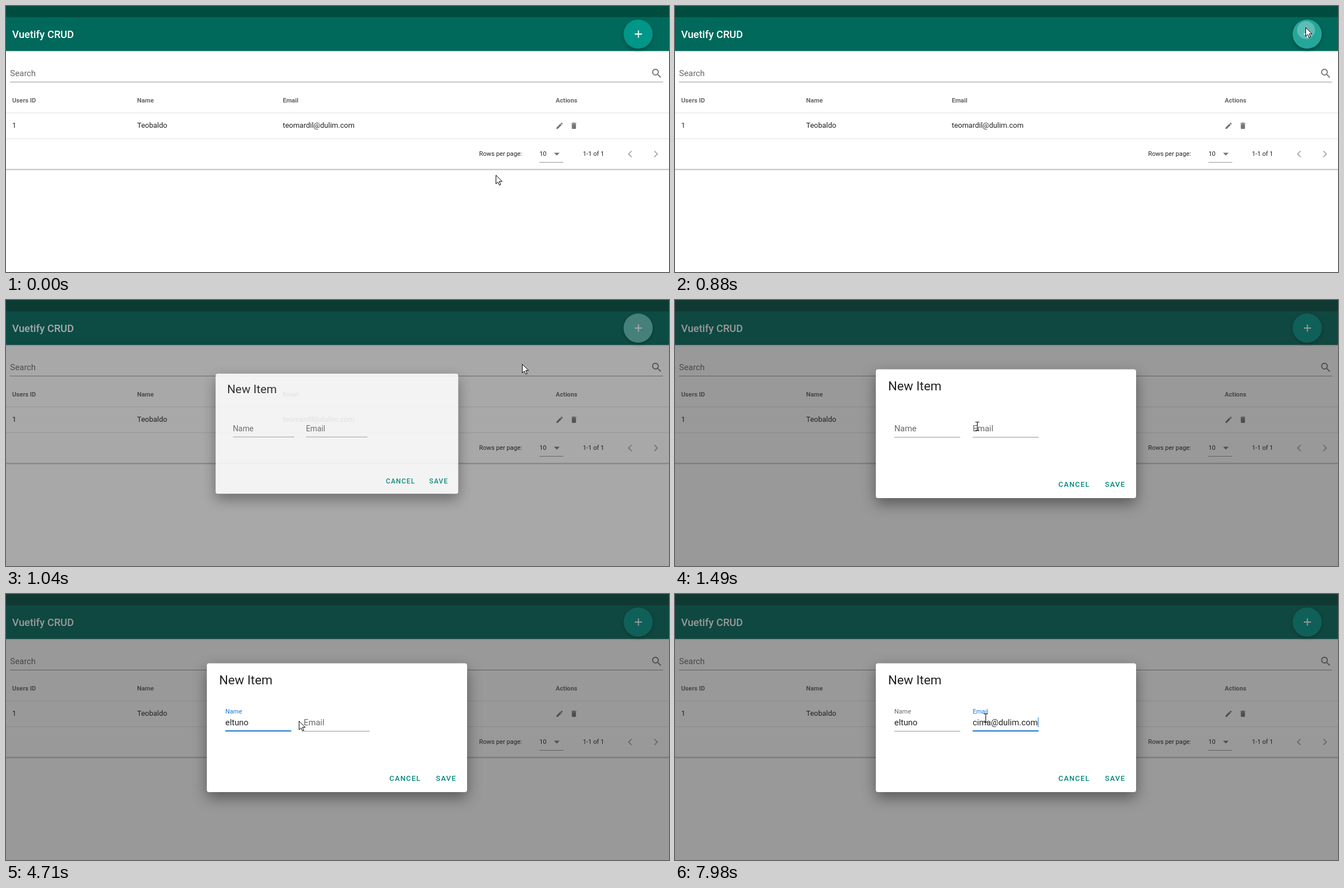
Write an HTML page that moves like this. It is 1182x474 px and loops after 8000 ms.

```html
<!DOCTYPE html>
<html lang="en">
<head>
<meta charset="utf-8">
<title>Vuetify CRUD</title>
<style>
  html, body { margin: 0; width: 100%; height: 100%; overflow: hidden; background: #fff; }
  svg { display: block; width: 1182px; height: 474px; font-family: Roboto, sans-serif; }
  text { fill: rgba(0, 0, 0, .87); white-space: pre; }
  .muted { fill: rgba(0, 0, 0, .6); }
  .head { font-size: 11.2px; font-weight: 700; }
  .cell { font-size: 13px; }
  .small { font-size: 11.2px; }
  .input { font-size: 14.9px; }
  .button { font-size: 13px; font-weight: 500; letter-spacing: .0893em; fill: #00897b; }
  .icon { fill: #757575; }
  .line { fill: rgba(0, 0, 0, .42); }
  .rule { fill: rgba(0, 0, 0, .12); }
  .primary { fill: #1976d2; }
  #card { filter: drop-shadow(0 1px 1px rgba(0, 0, 0, .45)); }
  #bar { filter: drop-shadow(0 1px 1px rgba(0, 0, 0, .25)); }
  #fab { filter: drop-shadow(0 2px 3px rgba(0, 0, 0, .35)); }
  #panel { filter: drop-shadow(0 10px 13px rgba(0, 0, 0, .42)); }
</style>
</head>
<body>
<svg viewBox="0 0 1182 474">
  <defs><clipPath id="fabClip"><circle cx="1127" cy="50" r="26"/></clipPath></defs>

  <rect id="card" x="-10" y="60" width="1202" height="230.5" fill="#fff"/>
  <rect id="bar" y="20" width="1182" height="60" fill="#00695c"/>
  <rect width="1182" height="20" fill="#004d40"/>
  <text x="11" y="56.5" style="font-size:18.4px;font-weight:500;fill:#fff">Vuetify CRUD</text>
  <circle id="fab" cx="1127" cy="50" r="26" fill="#009688"/>
  <path d="M1121 50h13M1127.5 43.5v13" stroke="#fff" stroke-width="1.9"/>
  <g clip-path="url(#fabClip)" fill="#fff">
    <circle id="hover" cx="1127" cy="50" r="26"/>
    <circle id="ripple" cx="1125" cy="43"/>
  </g>

  <text class="input muted" x="7.3" y="125.3">Search</text>
  <rect class="line" x="7" y="135" width="1164.5" height="1"/>
  <path class="icon" transform="translate(1149 109) scale(.93)" d="M9.5 3A6.5 6.5 0 0 1 16 9.5C16 11.11 15.41 12.59 14.44 13.73L14.71 14H15.5L20.5 19 19 20.5 14 15.5V14.71L13.73 14.44C12.59 15.41 11.11 16 9.5 16A6.5 6.5 0 0 1 9.5 3M9.5 5A4.5 4.5 0 0 0 9.5 14 4.5 4.5 0 0 0 9.5 5Z"/>

  <g class="head">
    <text class="muted" x="11" y="171.5">Users ID</text>
    <text class="muted" x="233.8" y="171.5">Name</text>
    <text class="muted" x="493.4" y="171.5">Email</text>
    <text class="muted" x="980" y="171.5">Actions</text>
  </g>
  <rect id="row" y="191" width="1182" height="45" fill="#eee"/>
  <rect class="rule" y="190" width="1182" height="1"/>
  <rect class="rule" y="236" width="1182" height="1"/>
  <g class="cell">
    <text x="11" y="217">1</text>
    <text x="233.8" y="217">Teobaldo</text>
    <text x="493.4" y="217">teomardil@dulim.com</text>
  </g>
  <path class="icon" transform="translate(979.5 206) scale(.62)" d="M20.71 7.04C21.1 6.65 21.1 6 20.71 5.63L18.37 3.29C18 2.9 17.35 2.9 16.96 3.29L15.12 5.12 18.87 8.87M3 17.25V21H6.75L17.81 9.93 14.06 6.18Z"/>
  <path class="icon" transform="translate(1005 206) scale(.62)" d="M19 4H15.5L14.5 3H9.5L8.5 4H5V6H19M6 19A2 2 0 0 0 8 21H16A2 2 0 0 0 18 19V7H6Z"/>

  <g class="small">
    <text x="843.5" y="267.3">Rows per page:</text>
    <text x="951" y="267.3">10</text>
    <text x="1028.5" y="267.3">1-1 of 1</text>
  </g>
  <path class="icon" d="M977 261.5h10l-5 5z"/>
  <rect class="line" x="951" y="278" width="42.5" height="1"/>
  <path d="M1115.3 258.3l-5.4 5.4 5.4 5.4M1155.9 258.3l5.4 5.4-5.4 5.4" fill="none" stroke="#a6a6a6" stroke-width="1.8"/>

  <rect id="scrim" width="1182" height="474" fill="#212121"/>
  <g id="dialog">
    <rect id="panel" x="358" y="123.5" width="464" height="229.5" rx="4" fill="#fff"/>
    <text x="380" y="160.5" style="font-size:22.4px">New Item</text>
    <g id="fields"></g>
    <text class="button" x="683.5" y="333">CANCEL</text>
    <text class="button" x="766.5" y="333">SAVE</text>
  </g>

  <path id="arrow" d="M.5 .5V16L4.1 12.6 6.6 18.3 9 17.2 6.6 11.6H11.5Z" fill="#fff" stroke="#000"/>
  <path id="beam" d="M-3.5-7.5H-1L0-7 1-7.5H3.5M-3.5 7.5H-1L0 7 1 7.5H3.5M0-7V7" fill="none" stroke="#000" stroke-width="1.1"/>
</svg>

<script>
const LOOP = 8000;
const $ = id => document.getElementById(id);
const clamp = v => Math.max(0, Math.min(1, v));
const easeOut = (t, start, length, power) => 1 - (1 - clamp((t - start) / length)) ** power;
const set = (node, attrs) => { for (const k in attrs) node.setAttribute(k, attrs[k]); };

// time, x, y of the mouse
const mousePath = [
  [0, 873, 301], [80, 878, 294], [420, 1010, 190], [680, 1122, 36], [880, 1124, 38],
  [960, 1050, 64], [1036, 920, 114], [1250, 650, 200], [1420, 540, 225], [1650, 490, 233.5],
  [4490, 490, 233.5], [4714, 539, 222], [4900, 554, 220.5]
];

const fields = [
  { label: 'Name', x: 391, value: 'eltuno', keys: [3220, 3460, 3600, 3690, 3770, 3920],
    focus: 1710, blur: 5095, dark: [[2370, 2830], [4390, 4890]] },
  { label: 'Email', x: 530.7, value: 'cima@dulim.com',
    keys: [5790, 5870, 6020, 6170, 6880, 7120, 7200, 7270, 7350, 7510, 7650, 7830, 7980, 7980],
    focus: 5095, blur: LOOP, dark: [[5650, 5790], [6650, 6880]] }
];

for (const f of fields) {
  const g = document.createElementNS('http://www.w3.org/2000/svg', 'g');
  g.innerHTML = `<rect class="line" x="${f.x}" y="244" width="117.5" height="1"/>
    <rect class="primary" y="243" height="2"/>
    <text x="${f.x}">${f.label}</text>
    <text class="input" x="${f.x}" y="234"></text>
    <rect class="primary" y="220" width="1" height="17"/>`;
  $('fields').append(g);
  [, f.bar, f.title, f.text, f.caret] = g.children;
}

function tick(t) {
  const [start, step] = t < 880 ? [0, 73.3] : t < 4560 ? [880, 78] : [4560, 77];
  return start + Math.floor((t - start) / step) * step;
}

function mouseAt(t) {
  const i = mousePath.findIndex(p => p[0] > t);
  if (i < 0) return mousePath.at(-1).slice(1);
  const [a, b] = [mousePath[i - 1], mousePath[i]];
  const k = (t - a[0]) / (b[0] - a[0]);
  return [a[1] + (b[1] - a[1]) * k, a[2] + (b[2] - a[2]) * k];
}

function drawField(f, t, now) {
  const float = easeOut(now, f.focus, 300, 3);
  const active = float - easeOut(now, f.blur, 300, 3);
  const focused = t >= f.focus && t < f.blur;
  const width = 117.5 * active;
  set(f.bar, { x: f.x + (117.5 - width) / 2, width });
  set(f.title, { y: 234 - 20.7 * float, class: focused ? 'primary' : 'muted' });
  f.title.style.fontSize = 14.9 - 3.7 * float + 'px';
  f.title.style.fill = focused ? '#1976d2' : '';
  f.text.textContent = f.value.slice(0, f.keys.filter(k => k <= t).length);
  const lit = focused && !f.dark.some(([from, to]) => t >= from && t < to);
  const end = f.text.textContent ? f.text.getComputedTextLength() : 0;
  set(f.caret, { x: Math.round(f.x + end), opacity: lit ? 1 : 0 });
}

function draw(t) {
  const now = tick(t);
  const [x, y] = mouseAt(now);
  const open = easeOut(now, 918, 300, 4);

  set($('scrim'), { opacity: .46 * easeOut(now, 918, 300, 3.7) });
  set($('dialog'), {
    opacity: open,
    transform: `translate(590 238.2) scale(${.5 + .5 * open}) translate(-590 -238.2)`
  });

  const fade = 1 - clamp((now - 1040) / 350);
  set($('hover'), { opacity: .15 * clamp((now - 600) / 200) * fade });
  set($('ripple'), {
    r: 16 + 40 * clamp((now - 880) / 150),
    opacity: now >= 880 ? .25 * fade : 0
  });
  set($('row'), { opacity: now < 880 ? clamp((24 - Math.abs(y - 208)) / 12) : 0 });

  fields.forEach(f => drawField(f, t, now));

  const typing = now > 1300 && y > 205 && y < 246 && fields.some(f => x >= f.x && x <= f.x + 117.5);
  const place = `translate(${Math.round(x)} ${Math.round(y)})`;
  set($('arrow'), { transform: place, opacity: typing ? 0 : 1 });
  set($('beam'), { transform: place, opacity: typing ? 1 : 0 });
}

function loop() {
  draw(performance.now() % LOOP);
  requestAnimationFrame(loop);
}
loop();
</script>
</body>
</html>
```
